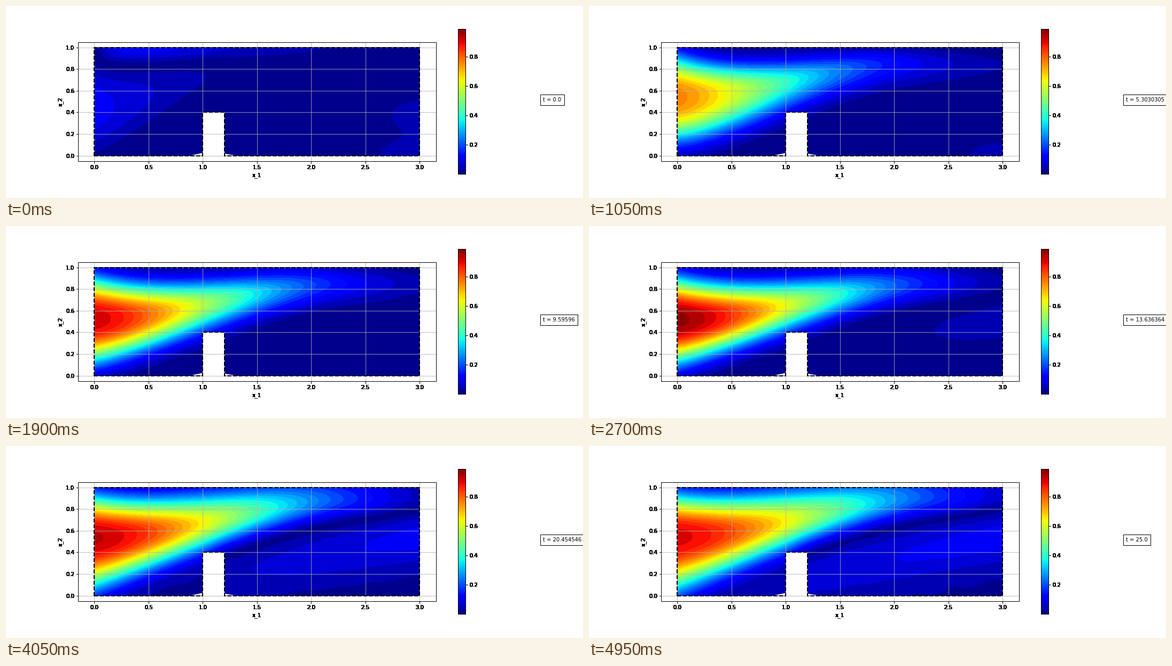
A matplotlib script that plays this animation: 1080 px wide and 360 px high, repeating every 5000 ms.

```python
import numpy as np
import matplotlib.pyplot as plt
from matplotlib.animation import FuncAnimation
from matplotlib.cm import ScalarMappable
from matplotlib.colors import Normalize
from matplotlib.patches import Polygon, Rectangle

plt.rcParams.update({
    "font.family": "DejaVu Sans",
    "font.size": 10,
    "figure.subplot.bottom": 0.125,
})

FRAMES = 100
T_END = 25
LOW, HIGH = 0.001, 0.99
LEVELS = np.linspace(LOW, HIGH, 34)

X, Y = np.meshgrid(np.linspace(0, 3, 181), np.linspace(0, 1, 81))
NEAR = np.exp(-X / 0.8)  # closeness to the inlet


def smooth(s):
    s = np.clip(s, 0, 1)
    return s * s * (3 - 2 * s)


def bump(x0, y0, rx, ry):
    return np.exp(-((X - x0) / rx) ** 2 - ((Y - y0) / ry) ** 2)


def inflow(t):
    """Jet from the left wall that bends upwards over the block."""
    young, fade = np.exp(-t / 4), np.exp(-t / 1.2)
    youth = young - fade
    late = smooth((t - 13) / 12)

    push = (1 - young) ** 1.5
    reach = 0.93 + 0.69 * push + 0.2 * late
    peak = 1 - 0.89 * young - 0.09 * late
    peak = peak * np.exp(-(X / reach) ** (1 + 0.77 * push))

    start = 0.515 + 0.11 * youth - 0.065 * fade + 0.035 * late
    end = 0.85 + 0.06 * late
    ridge = start + (end - start) * smooth(X / (2.4 - young))

    upper = 0.12 + 0.245 * np.exp(-X / 1.2)
    upper = upper * (1 - 0.9 * youth * (1 - NEAR)) + 0.07 * late * (1 - NEAR)
    lower = 0.16 + (0.225 + 0.09 * late) * NEAR
    lower = lower + 0.68 * youth * NEAR * (1 - NEAR)

    d = Y - ridge
    power = 2.7 - 0.7 * np.minimum(X, 1)
    return peak * np.exp(-(np.abs(d) / np.where(d > 0, upper, lower)) ** power)


def backflow(t):
    """Return flow behind the block, plus what is left of the initial state."""
    wake = np.interp(X, [1, 1.2, 3], [0, 0.075 * smooth((t - 13) / 12),
                                      0.105 * smooth((t - 8) / 12)])
    wake = wake * np.exp(-((Y - 0.35 - 0.2 * (X - 2)) / 0.29) ** 2)
    lid = 0.122 * (1 - np.exp(-X / 0.12)) * bump(0, 1, 1.9, 0.15)
    outlet = 0.055 * bump(3.1, 0.38, 0.45, 0.18)
    corner = 0.05 * np.exp(-(t / 14) ** 2) * bump(3.05, 0, 0.6, 0.2)
    return wake + corner + np.exp(-t / 1.2) * (lid + outlet)


def crossflow(t):
    ripple = 0.005 * np.sin(13 * X - 17 * Y) * np.sin(7 * X + 9 * Y)
    return smooth((t - 13) / 12) * (
        np.interp(X, [1, 1.25], [0.042, 0.025]) + ripple)


def speed(t):
    u = np.hypot(inflow(t) - backflow(t), crossflow(t))
    return np.clip(u, LOW + 1e-6, HIGH - 1e-6)


def harden(img, dpi):
    """Make every touched pixel opaque."""
    img[..., 3] = img[..., 3] > 0
    return img, 0, 0


def harden_axis(axis):
    for tick in axis.get_major_ticks():
        for part in (tick.label1, tick.label2, tick.tick1line, tick.tick2line):
            part.set_agg_filter(harden)
    axis.label.set_agg_filter(harden)


fig, ax = plt.subplots(figsize=(15, 5), dpi=72, facecolor="white")
bar = fig.colorbar(ScalarMappable(Normalize(LOW, HIGH), "jet"), ax=ax,
                   ticks=[0.2, 0.4, 0.6, 0.8])

VIEW = dict(xlim=(-0.15, 3.15), ylim=(-0.05, 1.0495))
ax.set_aspect("equal")
ax.set(xlabel="x_1", ylabel="x_2", **VIEW)
ax.set_xticks(np.arange(0, 3.1, 0.5))
ax.set_yticks(np.arange(0, 1.1, 0.2))
ax.grid()

# Block and the small gaps in the mesh beside it
white = dict(facecolor="white", edgecolor="none", zorder=1.2)
ax.add_patch(Rectangle((1, 0), 0.2, 0.4, **white))
ax.add_patch(Polygon([(0.885, 0), (1, 0.025), (1, 0)], **white))
ax.add_patch(Polygon([(1.2, 0.018), (1.305, 0), (1.2, 0)], **white))

outline = np.array([(0, 0), (1, 0), (1, 0.4), (1.2, 0.4), (1.2, 0),
                    (3, 0), (3, 1), (0, 1), (0, 0)])
ax.plot(*outline.T, "k--", linewidth=2)

clock = ax.text(1.3, 0.5, "", transform=ax.transAxes,
                bbox={"facecolor": "w", "pad": 5})

for axis in (ax.xaxis, ax.yaxis, bar.ax.yaxis):
    harden_axis(axis)
for artist in (*ax.spines.values(), bar.outline, clock):
    artist.set_agg_filter(harden)


def draw(i):
    for old in list(ax.collections):
        old.remove()
    t = np.float32(T_END * i / (FRAMES - 1))
    ax.contourf(X, Y, speed(float(t)), LEVELS, cmap="jet",
                vmin=LOW, vmax=HIGH, zorder=1)
    ax.set(**VIEW)
    clock.set_text("t = " + str(t))
    return []


anim = FuncAnimation(fig, draw, frames=FRAMES, init_func=lambda: draw(0),
                     interval=50, repeat=True, repeat_delay=0, blit=False)
plt.show()
```
